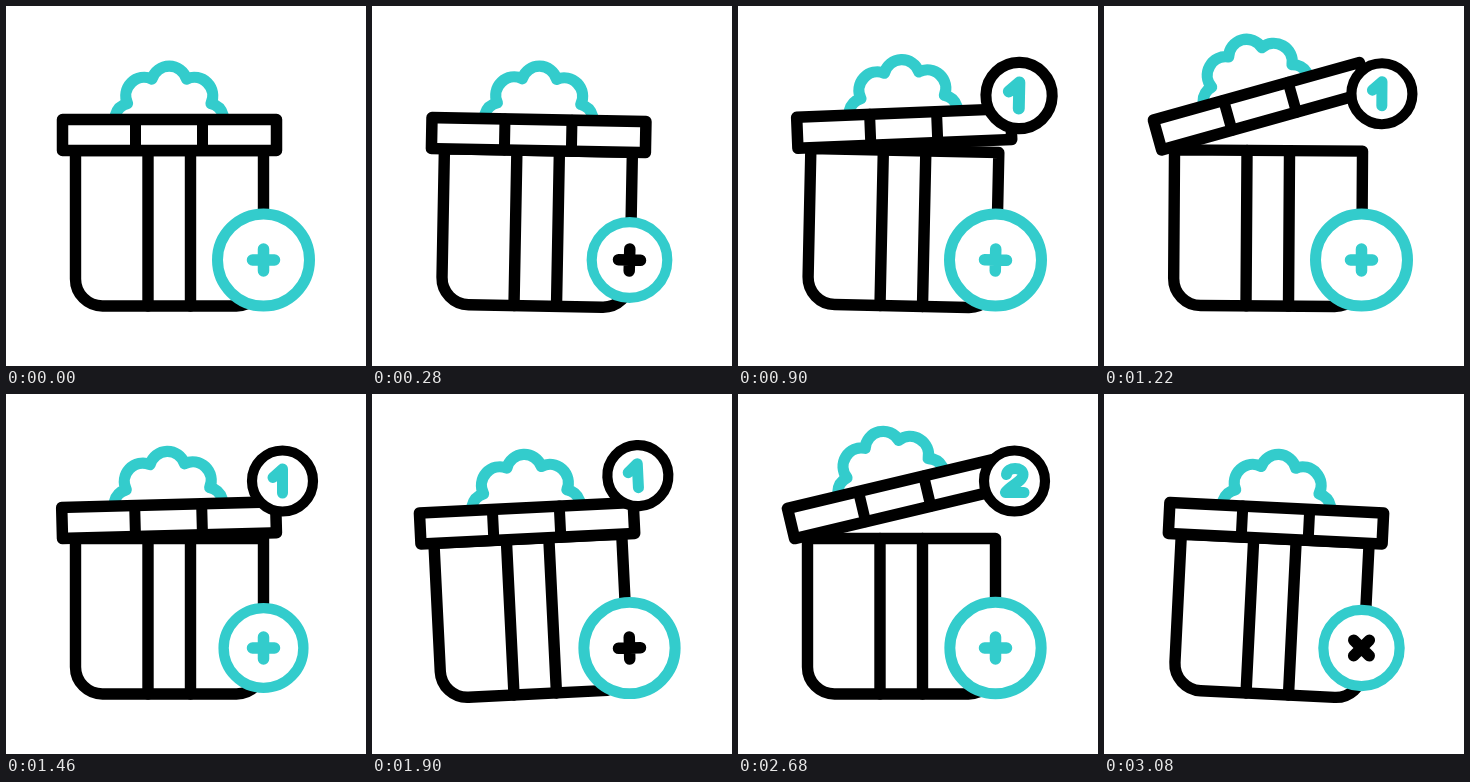
Animation, 360 px wide and 360 px high, one loop 3100 ms. Source, as an HTML page with a canvas:

```html
<!DOCTYPE html>
<html lang="en">
<head>
<meta charset="utf-8">
<title>Add to gift box</title>
<style>
html, body { margin: 0; width: 100%; height: 100%; overflow: hidden; background: #fff; }
canvas { display: block; width: 360px; height: 360px; }
</style>
</head>
<body>
<canvas id="stage" width="360" height="360"></canvas>
<script>
const ctx = document.getElementById('stage').getContext('2d');
const TEAL = '#33cccc', BLACK = '#000', WHITE = '#fff';
const LOOP = 3100, CLICK = 1327;
const RAD = Math.PI / 180;

// Keys are [time, value] pairs joined by sine easing.
function track(keys, t) {
  if (t <= keys[0][0]) return keys[0][1];
  for (let i = 1; i < keys.length; i++) {
    const [t0, a] = keys[i - 1], [t1, b] = keys[i];
    if (t < t1) return a + (b - a) * (1 - Math.cos(Math.PI * (t - t0) / (t1 - t0))) / 2;
  }
  return keys[keys.length - 1][1];
}

const SWING = [[200, 0], [400, 3.1], [600, -3.1], [800, 3.1], [920, 1.1], [1100, 1.1], [1300, 0]];
const LID = [[800, 0], [1120, -16], [1300, -16], [1500, 0]];
const PRESS = [[0, 0], [200, 8.2], [400, 8.2], [600, 0]];
const SPIN = [[250, 0], [600, 90], [890, 90], [1020, 180]];
const POP_IN = [[570, 0], [790, 1.12], [1100, 1]];
const PULSE = [[600, 1], [790, 1.12], [1100, 1]];
const POP_OUT = [[40, 1], [240, 0]];

const body = new Path2D('M69.5 144.5H257.5V273A27 27 0 0 1 230.5 300H96.5A27 27 0 0 1 69.5 273Z');
const stripes = new Path2D('M142 144.5V300M184.5 144.5V300');
const lid = new Path2D('M56.5 113.5H270.5V144.5H56.5Z');
const lidBars = new Path2D('M129.5 113.5V144.5M196.5 113.5V144.5');
const bow = new Path2D('M109.5 109Q112 100 121.5 97.5A18.5 18.5 0 0 1 146 73' +
  'A18 18 0 0 1 180.5 73A18.5 18.5 0 0 1 205 97.5Q214.5 100 217 109');
const digits = [
  new Path2D('M-9.5 -3.5L0 -12V12'),
  new Path2D('M-8 -6.5C-7 -14.5 8.5 -14.5 8.5 -6.5C8.5 0.5 -5 5 -9 11.5H9.5')
];
const plus = new Path2D('M-11 0H11M0 -11V11');

function draw(path, color, width, fill) {
  if (fill) {
    ctx.fillStyle = fill;
    ctx.fill(path);
  }
  ctx.strokeStyle = color;
  ctx.lineWidth = width;
  ctx.stroke(path);
}

function circle(r) {
  const p = new Path2D();
  p.arc(0, 0, r, 0, Math.PI * 2);
  return p;
}

function turn(x, y, deg) {
  ctx.translate(x, y);
  ctx.rotate(deg * RAD);
  ctx.translate(-x, -y);
}

function drawLid(deg) {
  ctx.save();
  turn(57, 144, deg);
  draw(bow, TEAL, 11.3);
  draw(lid, BLACK, 11.5, WHITE);
  draw(lidBars, BLACK, 11);
  ctx.restore();
}

function drawBadge(scale, digit) {
  if (scale < 0.01) return;
  ctx.save();
  ctx.translate(276.5, 87);
  ctx.scale(scale, scale);
  draw(circle(30.5), BLACK, 10.2, WHITE);
  draw(digits[digit], TEAL, 11);
  ctx.restore();
}

function drawButton(u) {
  const pressed = u >= 200 && u < 700;
  const press = track(PRESS, u);
  ctx.save();
  ctx.translate(257.5, 254);
  draw(circle(46 - press), TEAL, 11 - press * 0.1, WHITE);
  ctx.rotate(track(SPIN, u) * RAD);
  draw(plus, pressed ? BLACK : TEAL, 11.5);
  ctx.restore();
}

function render(t) {
  const round = Math.floor(t / CLICK), u = t - round * CLICK;
  const lidAngle = track(LID, u) + (round > 0 ? track(LID, u + CLICK) : 0);
  const badge = track([POP_IN, PULSE, POP_OUT][round], u);
  const digit = t < CLICK + 700 ? 0 : 1;

  ctx.fillStyle = WHITE;
  ctx.fillRect(0, 0, 360, 360);
  ctx.lineCap = ctx.lineJoin = 'round';

  ctx.save();
  turn(163, 300, track(SWING, u));
  draw(body, BLACK, 11.4, WHITE);
  draw(stripes, BLACK, 11.4);
  drawLid(lidAngle);
  drawBadge(badge, digit);
  ctx.restore();

  drawButton(u);
}

let start = null;
function tick(now) {
  if (start === null) start = now;
  render((now - start) % LOOP);
  requestAnimationFrame(tick);
}
render(0);
requestAnimationFrame(tick);
</script>
</body>
</html>
```
